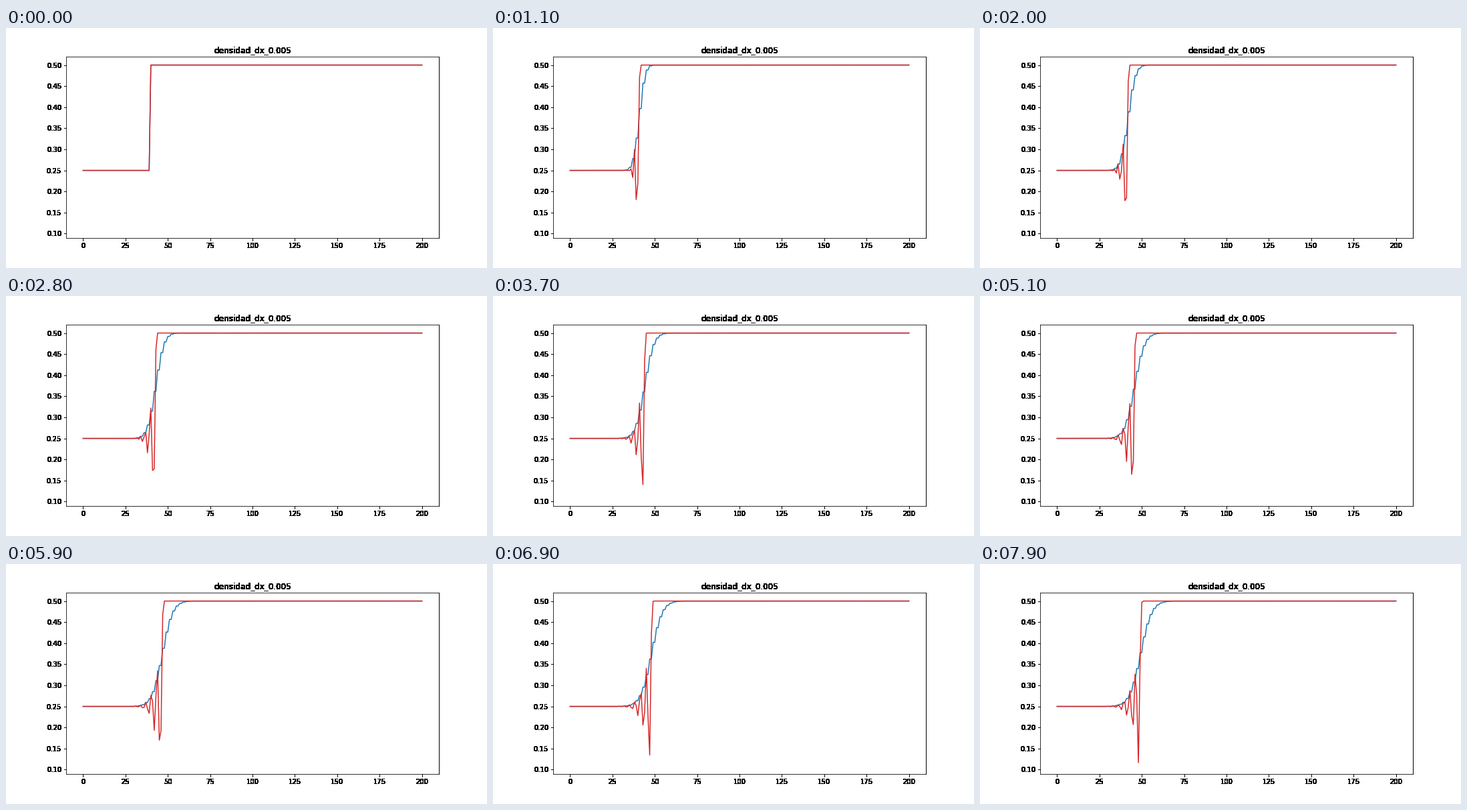
A matplotlib script for the animation above (8000 ms loop, 720 by 360 pixels).

```python
import numpy as np
import matplotlib.pyplot as plt
from matplotlib.animation import FuncAnimation

FRAMES, CELLS, JUMP = 80, 200, 40
LAM = 0.5  # dt / dx


def flux(u):
    return u * (1 - u)


def lax_friedrichs(u):
    new = u.copy()
    new[1:-1] = (u[2:] + u[:-2]) / 2 - LAM / 2 * (flux(u[2:]) - flux(u[:-2]))
    return new


def lax_wendroff(u):
    """Two-step Richtmyer form."""
    half = (u[1:] + u[:-1]) / 2 - LAM / 2 * np.diff(flux(u))
    new = u.copy()
    new[1:-1] -= LAM * np.diff(flux(half))
    return new


def solve(step, u):
    states = [u]
    while len(states) < FRAMES:
        states.append(step(states[-1]))
    return np.array(states)


def solid_black(img, dpi):
    """Make every touched pixel opaque black, giving hard, heavy edges."""
    out = np.zeros_like(img)
    out[..., 3] = img[..., 3] > 0
    return out, 0, 0


x = np.arange(CELLS + 1)
start = np.where(x < JUMP, 0.25, 0.5)
runs = [solve(lax_friedrichs, start), solve(lax_wendroff, start)]

plt.rcParams.update({"font.family": "DejaVu Sans",
                     "text.kerning_factor": 6,
                     "figure.subplot.bottom": 0.125})
fig, ax = plt.subplots(figsize=(10, 5), dpi=72)
title = ax.set_title("densidad_dx_0.005")
lines = [ax.plot(x, start, color=c, lw=1.5)[0] for c in ("tab:blue", "tab:red")]

low, high = np.min(runs), np.max(runs)
pad = 0.05 * (high - low)
ax.set_ylim(low - pad, high + pad)
ax.set_xlim(-0.05 * CELLS, 1.05 * CELLS)

for part in (title, ax.xaxis, ax.yaxis, ax.spines["right"]):
    part.set_agg_filter(solid_black)


def update(i):
    for line, run in zip(lines, runs):
        line.set_ydata(run[i])
    return lines


anim = FuncAnimation(fig, update, frames=FRAMES, interval=100,
                     init_func=lambda: update(0), repeat=True, repeat_delay=0)
plt.show()
```
